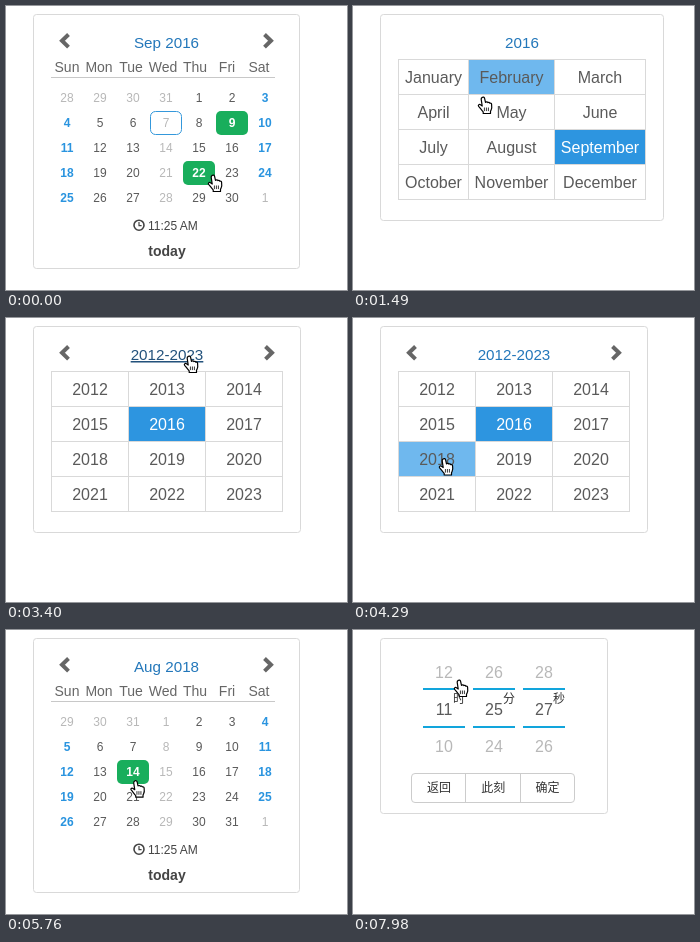
Write an HTML page that moves like this. It is 341 px wide and 284 px high and loops after 8 s.

```html
<!DOCTYPE html>
<html lang="en">
<head>
<meta charset="utf-8">
<title>Date picker</title>
<style>
  html, body { margin: 0; width: 100%; height: 100%; overflow: hidden; background: #fff; }
  svg { display: block; width: 100%; height: 100%; }
  text { font-family: "Liberation Sans", Arial, sans-serif; font-size: 12px; text-anchor: middle; fill: #5a5a5a; }
  .title { font-size: 15.2px; fill: #2377ba; }
  .title .on { fill: #23527c; text-decoration: underline; }
  .head { font-size: 14px; fill: #666; }
  .big { font-size: 16px; }
  .off { fill: #b8b8b8; }
  .end { fill: #2a94df; font-weight: bold; }
  .pick { fill: #fff; font-weight: bold; }
  .white { fill: #fff; }
  .today { font-size: 14px; font-weight: bold; fill: #444; }
  .clock { text-anchor: start; fill: #444; }
  .cjk { font-family: "Noto Sans CJK SC", "Noto Sans CJK", "Noto Sans CJK JP", sans-serif; fill: #333; }
</style>
</head>
<body>
<svg id="stage" viewBox="0 0 341 284"></svg>
<script>
const LOOP = 8000, STEP = 147.5;
const WEEK = 'Sun Mon Tue Wed Thu Fri Sat'.split(' ');
const MONTHS = ('January February March April May June July August ' +
  'September October November December').split(' ');

// pointer path: [step, x, y]
const PATH = [
  [0, 206, 169], [5, 143, 42], [7, 142, 40], [8, 140, 44], [9, 140, 44], [10, 129, 91],
  [12, 157, 104], [14, 162, 110], [16, 179, 45], [17, 182, 42], [20, 184, 40], [23, 182, 38],
  [25, 170, 48], [28, 88, 140], [30, 92, 141], [33, 150, 139], [34, 152, 136], [35, 152, 136],
  [36, 153, 138], [40, 124, 153], [41, 124, 153], [45, 168, 241], [47, 168, 241],
  [48, 168, 240.5], [49, 168, 240.5], [50, 168, 232], [51, 168, 214], [53, 168, 214], [54, 105, 50]
];

// views by starting step
const VIEWS = [
  [0, p => days(2016, 8, 9, p)],
  [7, p => months(2016, 8, p)],
  [13, p => days(2016, 4, 0, p)],
  [21, p => years(2012, 2016, p)],
  [30, p => months(2018, 4, p)],
  [37, (p, n) => days(2018, 7, n >= 40 ? 14 : 0, p)],
  [52, () => clock()]
];

const stage = document.getElementById('stage');
const text = (s, x, y, cls = '') => `<text x="${x}" y="${y}" class="${cls}">${s}</text>`;
const box = (x, y, w, h, fill, r = 0, line = 'none') =>
  `<rect x="${x}" y="${y}" width="${w}" height="${h}" rx="${r}" fill="${fill}" stroke="${line}"/>`;
const path = (d, line, w = 1, fill = 'none') =>
  `<path d="${d}" stroke="${line}" stroke-width="${w}" fill="${fill}"/>`;
const card = (w, h) => box(27.5, 8.5, w, h, '#fff', 3, '#d9d9d9');
const inside = (p, x, y, w, h) => p.x >= x && p.x < x + w && p.y >= y && p.y < y + h;

function hot(p, x, y, w, h) {
  const hit = inside(p, x, y, w, h);
  if (hit) p.kind = 'hand';
  return hit;
}

function pointerAt(n) {
  const i = Math.max(1, PATH.findIndex(k => k[0] >= n));
  const [a, b] = [PATH[i - 1], PATH[i]];
  const u = (n - a[0]) / (b[0] - a[0]), e = u * u * (3 - 2 * u);
  return { x: a[1] + (b[1] - a[1]) * e, y: a[2] + (b[2] - a[2]) * e };
}

function arrows(right) {
  return path('M62.5 28.5L56 34.8l6.5 6.3', '#666', 4) +
    path(`M${right - 3.5} 28.5l6.5 6.3-6.5 6.3`, '#666', 4);
}

// parts: [label, left, width]
function title(parts, mid, p) {
  const spans = parts.map(([s, x, w]) =>
    `<tspan class="${hot(p, x, 28, w, 19) ? 'on' : ''}">${s}</tspan>`);
  return text(spans.join(' '), mid, 42, 'title');
}

function days(year, month, picked, p) {
  const first = new Date(year, month, 1).getDay();
  let out = card(266, 254) + arrows(262) +
    title([[MONTHS[month].slice(0, 3), 126, 32], [year, 159, 36]], 160.5, p);
  WEEK.forEach((d, i) => out += text(d, 61 + 32 * i, 66, 'head'));
  out += path('M45 71.5H269', '#c8c8c8');

  for (let i = 0; i < 35; i++) {
    const col = i % 7, x = 61 + 33 * col, y = 92 + 25 * Math.floor(i / 7);
    const date = new Date(year, month, i - first + 1), d = date.getDate();
    const mine = date.getMonth() === month, off = !mine || col === 3;
    const over = inside(p, x - 16, y - 12, 32, 24);
    const now = mine && year === 2016 && month === 8 && d === 7;
    const on = !off && (over || d === picked);
    if (over) p.kind = off ? 'blocked' : 'hand';
    if (on) out += box(x - 16, y - 12, 32, 24, '#19ae5c', 5);
    if (now) out += box(x - 15.5, y - 11.5, 31, 23, '#fff', 5, '#3498db');
    out += text(d, x, y + 4.2, on ? 'pick' : off ? 'off' : col % 6 ? '' : 'end');
  }

  if (hot(p, 45, 206, 231, 25)) out += box(45, 206, 231, 25, '#ebebeb', 5);
  if (hot(p, 45, 231, 231, 27)) out += box(45, 231, 231, 27, '#ebebeb', 5);
  return out + '<circle cx="133" cy="219.2" r="5" fill="none" stroke="#444" stroke-width="1.6"/>' +
    path('M133 216v3.6h2.6', '#444', 1.2) +
    text('11:25 AM', 142, 223.6, 'clock') + text('today', 161, 250, 'today');
}

// 3 x 4 table with column edges xs
function table(labels, xs, chosen, p) {
  let out = '', grid = '';
  labels.forEach((s, i) => {
    const x = xs[i % 3], w = xs[i % 3 + 1] - x, y = 53.5 + 35 * Math.floor(i / 3);
    const over = hot(p, x, y, w, 35), on = i === chosen;
    if (on || over) out += box(x, y, w, 35, on ? '#2d95e0' : '#6fb8ee');
    grid += box(x, y, w, 35, 'none', 0, '#d9d9d9');
    if (on) grid += box(x + .5, y + .5, w - 1, 34, '#2d95e0');
    grid += text(s, x + w / 2, y + 23.6, on ? 'big white' : 'big');
  });
  return out + grid;
}

function months(year, chosen, p) {
  return card(283, 206) + title([[year, 151, 36]], 169, p) +
    table(MONTHS, [45.5, 115.5, 201.5, 292.5], chosen, p);
}

function years(from, chosen, p) {
  const list = Array.from({ length: 12 }, (_, i) => from + i);
  return card(267, 206) + arrows(263) + title([[`${from}-${from + 11}`, 124, 75]], 161, p) +
    table(list, [45.5, 122.5, 199.5, 276.5], chosen - from, p);
}

function clock() {
  let out = card(227, 175);
  [[11, '时'], [25, '分'], [27, '秒']].forEach(([v, unit], i) => {
    const x = 91 + 50 * i;
    out += text(v + 1, x, 47.5, 'big off') + text(v, x, 84.5, 'big') + text(v - 1, x, 121.5, 'big off') +
      path(`M${x - 21} 59h42m-42 38h42`, '#12a5dc', 2) + text(unit, x + 15, 73, 'cjk');
  });
  out += box(58.5, 143.5, 163, 29, '#fff', 3.5, '#ccc') + path('M112.5 143.5v29m55-29v29', '#ccc');
  ['返回', '此刻', '确定'].forEach((s, i) => out += text(s, 86 + 54.3 * i, 162.3, 'cjk'));
  return out;
}

function pointer(x, y, kind) {
  const at = (dx, dy, s) => `<g transform="translate(${x + dx} ${y + dy})" stroke-linejoin="round">${s}</g>`;
  if (kind === 'hand') return at(-5, -1,
    path('M5 1.5c1-.9 2.3-.4 2.6.8l.9 4c.6-.7 1.9-.6 2.3.3.7-.5 1.7-.2 2 .6.8-.3 1.7.2 1.8 1.1' +
      '.3 2.2.4 4-.5 5.7l-.6 1.3v2.2H6.2v-1.6C4.4 14 3.2 12 1.6 10.3c-.8-1 .4-2.4 1.9-1.5' +
      'l1.7 1.2L4.2 3.4C4.1 2.6 4.4 2 5 1.5z', '#000', 1.2, '#fff') +
    path('M7.4 11.5v3.6m2-3.6v3.6m2-3.6v3.6', '#000', .8));
  const arrow = path('M0-1v13l3-2.8 2 4.6 2-.9-2-4.5h4.2z', '#fff', 1, '#000');
  const ban = '<circle cx="9" cy="22" r="8" fill="#eee" stroke="#999" stroke-width="3.4"/>' +
    path('M4 17l10 10', '#999', 3.4) +
    '<circle cx="9" cy="22" r="8" fill="none" stroke="#eee" stroke-width="1.6"/>' +
    path('M3.6 16.6l10.8 10.8', '#eee', 1.6);
  return at(0, 0, (kind === 'blocked' ? ban : '') + arrow);
}

let last = -1;
function draw() {
  const n = Math.floor(performance.now() % LOOP / STEP);
  if (n !== last) {
    last = n;
    const { x, y } = pointerAt(n);
    const view = VIEWS.filter(v => v[0] <= n).pop();
    // hover trails the drawn tip slightly
    const p = { x, y: y - 4, kind: view[0] === 52 ? 'hand' : 'arrow' };
    stage.innerHTML = view[1](p, n) + pointer(x, y, p.kind);
  }
  requestAnimationFrame(draw);
}
draw();
</script>
</body>
</html>
```
